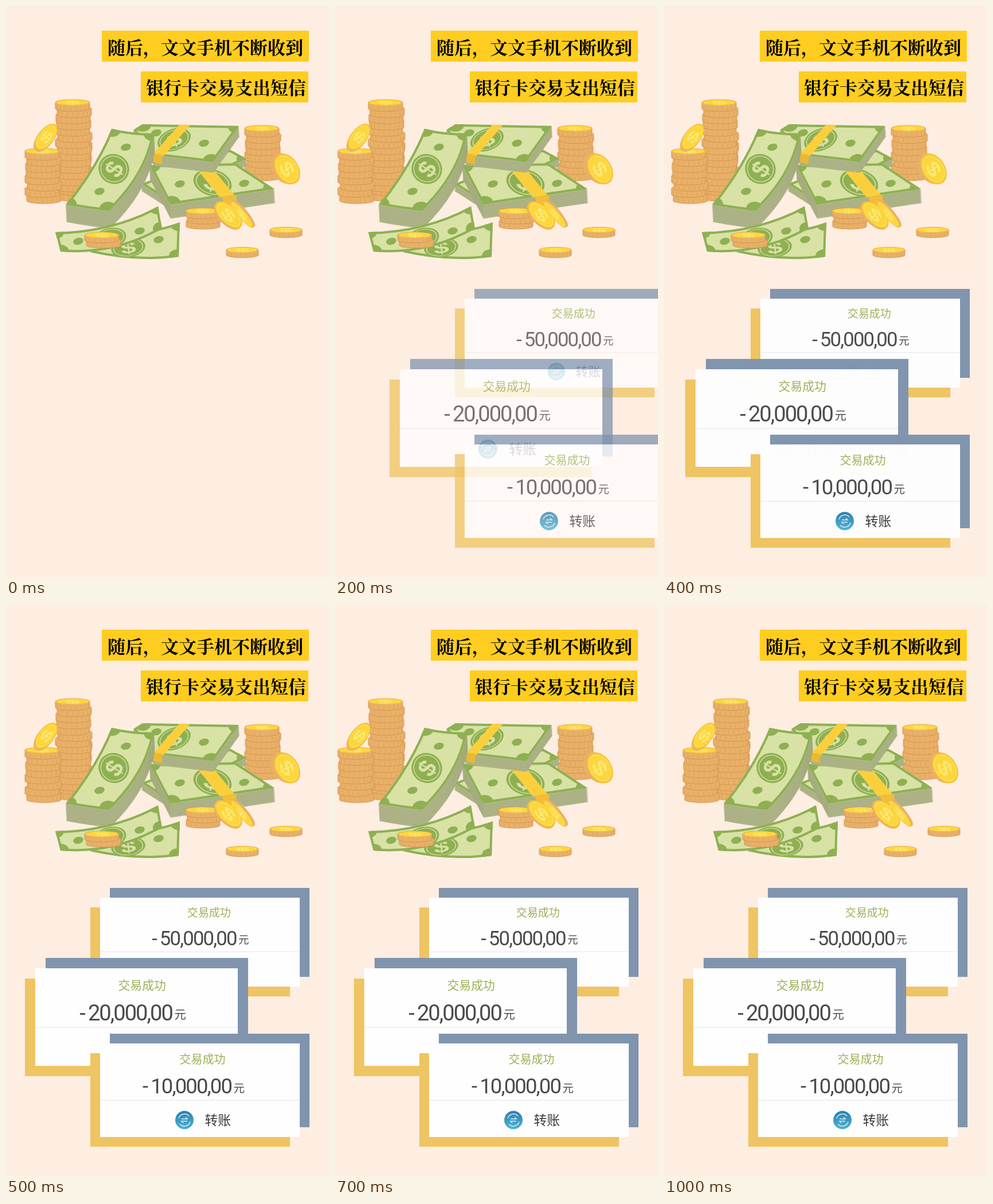
An HTML page for the animation above (1.9 s loop, 563x995 px).

```html
<!DOCTYPE html>
<html lang="zh-CN">
<head>
<meta charset="utf-8">
<style>
html, body { margin: 0; width: 100%; height: 100%; overflow: hidden; background: #feede1; }
svg { display: block; width: 100%; height: 100%; }
text { font-family: "Noto Sans CJK SC", sans-serif; }
.head { font: 900 31px "Noto Serif CJK SC", "Noto Sans CJK SC", serif; }
.sum { font: 36.5px Roboto, sans-serif; letter-spacing: -1.9px; }
.sign { font: bold 16px "Liberation Sans", sans-serif; text-anchor: middle; }
</style>
</head>
<body>
<svg viewBox="0 0 563 995">
  <defs>
    <linearGradient id="sea" x2="0" y2="1"><stop stop-color="#2b7fae"/><stop offset="1" stop-color="#4fb3d3"/></linearGradient>
  </defs>
  <path fill="#ffcd1f" d="M167 43h361v54h-361zM235 114h292v54h-292z"/>
  <text class="head" x="177" y="83.500">随后，文文手机不断收到</text>
  <text class="head" x="244" y="154">银行卡交易支出短信</text>
  <g id="money"></g>
  <g id="cards"></g>
</svg>
<script>
const GREEN = '#8eb052', PALE = '#d8e2a5', SIDE = '#e9b068', RIDGE = '#d08d47';
const $ = id => document.getElementById(id);
const range = n => [...Array(n).keys()];

const shape = (d, fill) => `<path d="${d}" fill="${fill}"/>`;

const oval = (x, y, rx, ry, fill, rot = 0) =>
  `<ellipse rx="${rx}" ry="${ry}" fill="${fill}" transform="translate(${x} ${y}) rotate(${rot})"/>`;

// Round emblem with a dollar sign, drawn at radius 10 and squeezed into an ellipse
const emblem = (x, y, rx, ry, rot, rim, fill, ink) =>
  `<g transform="translate(${x} ${y}) rotate(${rot}) scale(${rx / 10} ${ry / 10})">
    <circle r="10" fill="${rim}"/><circle r="8.500" fill="${fill}" stroke="${ink}" stroke-width=".5"/>
    <text class="sign" y="5.700" fill="${ink}">$</text></g>`;

const face = (x, y, rx, ry, rot = 0) => emblem(x, y, rx, ry, rot, '#fac42f', '#fcd63c', '#fbe873');

function slab(x, y, w, h) {
  const r = w / 2, q = w / 12;
  const ridges = [-.9, -.7, -.4, -.1, .2, .5, .75, .92].map(u =>
    `M${x + r + r * u} ${y + 2 + q * Math.sqrt(1 - u * u)}v${h - 3}`);
  return `<path d="M${x} ${y}v${h}a${r} ${q} 0 0 0 ${w} 0v${-h}a${r} ${q} 0 0 0 ${-w} 0z" fill="${SIDE}" stroke="${RIDGE}" stroke-width=".8"/>
    <path d="${ridges.join('')}" stroke="${RIDGE}" opacity=".4"/>`;
}

function stack(x, y, n, w = 60, h = 10.8) {
  const slabs = range(n).reverse().map(i => slab(x + [0, 3, 1, 2, 0, 4][i % 6], y + i * h, w, h));
  return slabs.join('') + face(x + w / 2, y, w / 2, w / 12);
}

const tilted = (x, y, rx, ry, rot, dx, dy) =>
  [1, .75, .5, .25].map(k => oval(x + dx * k, y + dy * k, rx, ry, SIDE, rot)).join('') +
  face(x, y, rx, ry, rot);

let clips = 0;
// A banknote; a height makes it a bundle. Corners, dots and seal are clipped to the note.
function note(d, { height = 0, corners = [], dots = [], seal, extra = '' }) {
  const id = 'note' + clips++;
  const pages = range(Math.floor(height / 3)).reverse().map(i =>
    `<path d="${d}" transform="translate(${i * .15} ${i * 3 + 3})" fill="#b2b78b" stroke="#98a374" stroke-width=".7"/>`);
  return pages.join('') + `<clipPath id="${id}"><path d="${d}"/></clipPath><g clip-path="url(#${id})">
    <path d="${d}" fill="${PALE}" stroke="${GREEN}" stroke-width="8"/>
    ${corners.map(([x, y]) => oval(x, y, 15, 12, GREEN)).join('')}
    ${dots.map(([x, y]) => oval(x, y, 9, 6, GREEN, -15)).join('')}
    ${seal ? emblem(...seal, GREEN, GREEN, PALE) : ''}${extra}</g>`;
}

$('money').innerHTML = [
  stack(90, 228, 10, 57),
  stack(86, 168, 14),
  stack(33, 253, 8),
  tilted(70, 228, 27, 14, -52, -2, 3),
  stack(416, 213, 8),
  tilted(490, 284, 29, 20, 58, -6, -1),
  note('M236 310L390 250 419 266 275 335Z', { height: 12, corners: [[417, 266]] }),
  note('M250 277L400 274 468 319 286 346Z', {
    height: 24,
    corners: [[254, 278], [463, 318], [289, 343]],
    dots: [[303, 310], [415, 309]],
    seal: [360, 308, 34, 23, 15],
    extra: shape('M336 288L364 288 402 334 378 340Z', '#fbcf3c'),
  }),
  shape('M376 333L401 329 402 345 382 349Z', '#f2bd38'),
  note('M238 206L406 209 361 272 258 260 222 216Z', {
    height: 19,
    corners: [[238, 207], [402, 210], [358, 270]],
    dots: [[345, 239], [262, 221]],
    seal: [293, 233, 30, 19, -20],
    extra: shape('M303 206H322L273 263 256 259Z', '#fbcf3c'),
  }),
  shape('M257 257L272 259V276L257 272Z', '#eab934'),
  note('M184 214Q220 222 258 222Q245 295 180 357Q145 354 104 346Q155 284 184 214Z', {
    height: 31,
    corners: [[185, 216], [255, 223], [178, 353], [108, 345]],
    dots: [[209, 246], [163, 323]],
    seal: [188, 284, 26, 27, -58],
  }),
  note('M146 429L200 398Q260 392 303 377L301 437Q230 448 146 429Z', {
    corners: [[301, 380], [299, 436]], dots: [[266, 407]], seal: [213, 421, 30, 17, -8],
  }),
  note('M86 394Q185 392 265 349L272 388Q190 436 95 428Z', {
    corners: [[86, 394], [264, 351], [271, 388], [95, 428]],
    dots: [[126, 410], [233, 392]],
    seal: [181, 405, 29, 18, -14],
  }),
  stack(137, 399, 2, 60, 9),
  stack(313, 357, 3, 59, 9),
  tilted(388, 364, 30, 15, 45, -2, 2),
  tilted(411, 363, 30, 7, 50, 3, -2),
  stack(460, 390, 1, 56, 9),
  stack(384, 425, 1, 56, 9),
].join('');

const card = (x, y, w, h, gap, inset, sum) => {
  const scale = h / 163;
  const box = (dx, dy, fill) => `<rect x="${dx}" y="${dy}" width="${w}" height="${h}" fill="${fill}"/>`;
  return `<g class="card" data-x="${x}" data-y="${y}">
    ${box(-gap, gap, '#efc462')}${box(gap, -gap, '#8094ae')}${box(0, 0, '#fefefe')}
    <g transform="translate(${inset}) scale(${scale})">
      <path d="M${-inset / scale} 99H${(w - inset) / scale}" stroke="#f0f0f1" stroke-width="2"/>
      <text x="138.500" y="35" font-size="20" fill="#9bb056">交易成功</text>
      <text class="sum" x="74" y="87" fill="#4a4a4c">-<tspan dx="6">${sum}</tspan></text>
      <text x="232.500" y="84.500" font-size="19.500" fill="#4a4a4c">元</text>
      <g transform="translate(147 133.500)"><circle r="16" fill="url(#sea)"/>
        <path d="M-10-3A10.500 10.500 0 0 1 8-7M10 3A10.500 10.500 0 0 1-8 7M-5-2H5L2-5M5 2H-5L-2 5" fill="none" stroke="#d5eef6" stroke-width="1.500"/></g>
      <text x="182.500" y="141.500" font-size="22.800" fill="#39393b">转账</text>
    </g></g>`;
};

$('cards').innerHTML =
  card(164, 510, 348, 155, 17, 20, '50,000,00') +
  card(51, 633, 353, 170, 18, 0, '20,000,00') +
  card(164, 764, 348, 163, 17, 0, '10,000,00');
const cards = document.querySelectorAll('.card');

const LOOP = 1900, STEP = 100;
const shake = [0, 0, -28, 28, -20, 0, 20, -28];

function draw(now) {
  const step = Math.floor(now % LOOP / STEP);
  const left = Math.max(0, 1 - step * STEP / 540) ** 3;
  $('money').setAttribute('transform', `translate(${shake[step] || 0})`);
  for (const c of cards) {
    c.setAttribute('transform', `translate(${+c.dataset.x + Math.round(250 * left)} ${c.dataset.y})`);
    c.setAttribute('opacity', 1 - left);
  }
}

const start = performance.now();
function tick() {
  draw(performance.now() - start);
  requestAnimationFrame(tick);
}
tick();
</script>
</body>
</html>
```
